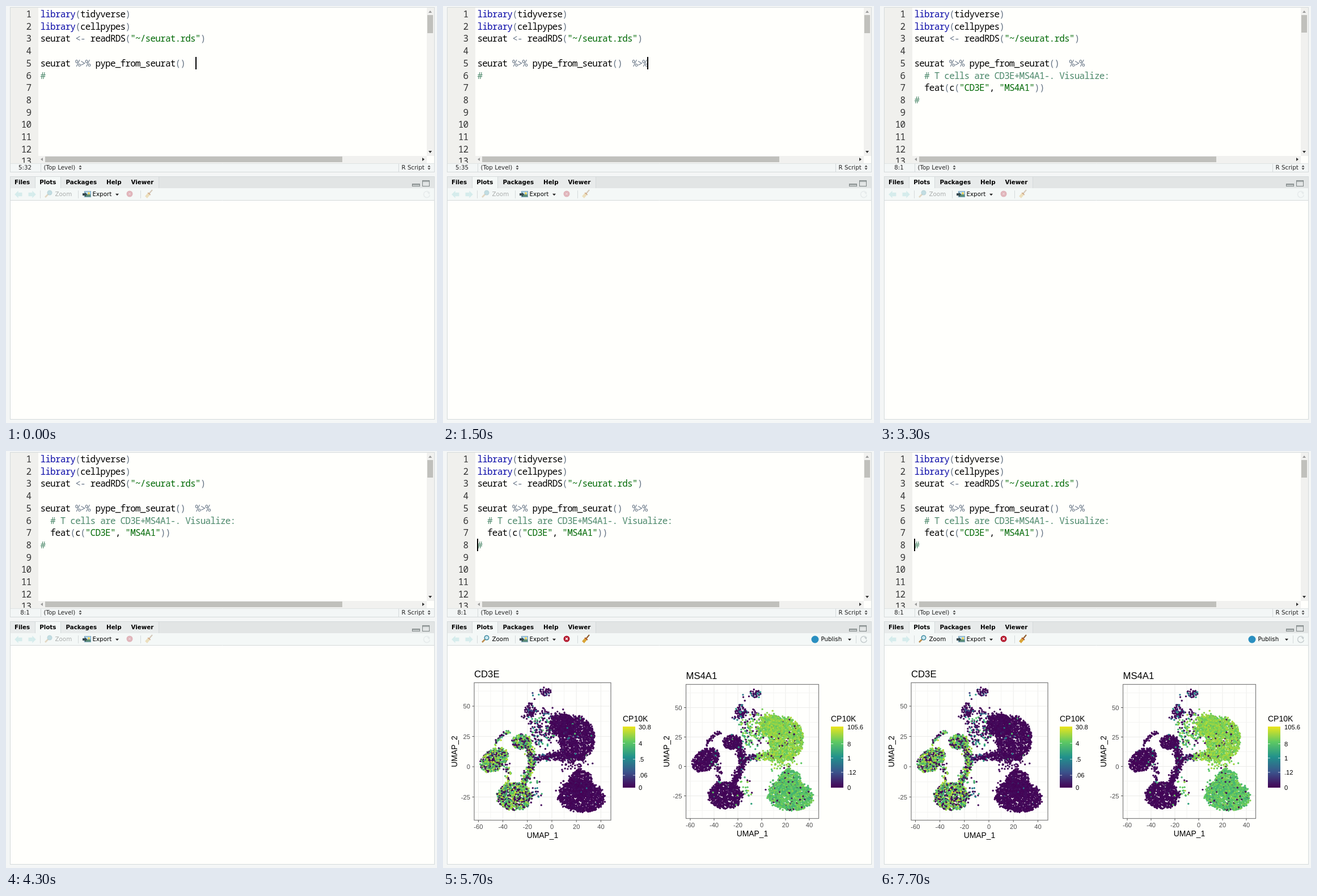
An HTML page with a canvas for the animation above (8 s loop, 760x737 px).

```html
<!DOCTYPE html>
<html lang="en">
<head>
<meta charset="utf-8">
<title>Feature plots in an R session</title>
<style>
  html, body { margin: 0; width: 100%; height: 100%; overflow: hidden; background: #f4f6f6; }
  canvas { display: block; }
</style>
</head>
<body>
<canvas id="stage" width="760" height="737"></canvas>
<script>
const W = 760, H = 737, LOOP = 8000;
const ctx = document.getElementById('stage').getContext('2d');
const UI = '10.3px "DejaVu Sans", sans-serif';
const CODE = '16px "Noto Sans Mono", monospace';
const ADVANCE = 8.82, LINE = 21.7, CODE_X = 60.4;
const PAPER = '#fffffc', BORDER = '#d5dadb', TRACK = '#f1f1ef', THUMB = '#c0c0bc';

// ---------- drawing helpers ----------
function rect(c, x, y, w, h, fill) {
  c.fillStyle = fill;
  c.fillRect(x, y, w, h);
}
function frame(c, x, y, w, h, color, width = 1) {
  c.strokeStyle = color;
  c.lineWidth = width;
  c.strokeRect(x, y, w, h);
}
function text(c, str, x, y, font, color = '#000', align = 'left') {
  c.font = font;
  c.fillStyle = color;
  c.textAlign = align;
  c.fillText(str, x, y);
}
function disc(c, x, y, r, fill) {
  c.fillStyle = fill;
  c.beginPath();
  c.arc(x, y, r, 0, Math.PI * 2);
  c.fill();
}
function line(c, x0, y0, x1, y1, color, width = 1) {
  c.strokeStyle = color;
  c.lineWidth = width;
  c.beginPath();
  c.moveTo(x0, y0);
  c.lineTo(x1, y1);
  c.stroke();
}
const vline = (c, x, y0, y1, color) => line(c, x, y0, x, y1, color);
const hline = (c, y, x0, x1, color) => line(c, x0, y, x1, y, color);

// Triangle of half-width w whose tip points along (dx, dy)
function triangle(c, x, y, w, h, dx, dy, color) {
  const tipX = x + dx * h / 2, tipY = y + dy * h / 2;
  const baseX = x - dx * h / 2, baseY = y - dy * h / 2;
  c.fillStyle = color;
  c.beginPath();
  c.moveTo(tipX, tipY);
  c.lineTo(baseX - dy * w, baseY + dx * w);
  c.lineTo(baseX + dy * w, baseY - dx * w);
  c.fill();
}
function arrow(c, x, y, dx, size, color) {
  triangle(c, x + dx * size * .55, y, size, size, dx, 0, color);
  rect(c, x - size * (dx > 0 ? 1 : .1), y - size / 2, size * 1.1, size, color);
}
function layer(draw) {
  const canvas = document.createElement('canvas');
  canvas.width = W;
  canvas.height = H;
  draw(canvas.getContext('2d'));
  return canvas;
}

// ---------- random cells ----------
let seed = 20;
function random() {
  seed = (seed + 0x6D2B79F5) | 0;
  let t = Math.imul(seed ^ (seed >>> 15), 1 | seed);
  t = (t + Math.imul(t ^ (t >>> 7), 61 | t)) ^ t;
  return ((t ^ (t >>> 14)) >>> 0) / 4294967296;
}
const between = (a, b) => a + (b - a) * random();
const gauss = () => random() + random() + random() + random() - 2;
const level = (zeros, lo, hi) => random() < zeros ? between(0, .04) : between(lo, hi);

// Cells per squared radius, and expression of both genes, for each kind of cell
const KINDS = {
  tcell:  { density: 1.05, cd3e: () => level(.33, .58, .94), ms4a1: () => level(.97, .4, .75) },
  bcell:  { density: 1.05, cd3e: () => level(.985, .3, .7), ms4a1: () => level(.05, .74, .9) },
  lowerB: { density: 1.1, cd3e: () => level(.995, .3, .6), ms4a1: () => level(.05, .62, .83) },
  mixed:  { density: .2, cd3e: () => level(.62, .35, .75), ms4a1: () => level(.2, .55, .88) },
  quiet:  { density: .45, cd3e: () => level(.8, .15, .6), ms4a1: () => level(.78, .15, .6) },
};
const cells = [];
function addCell(kind, x, y) {
  cells.push({ x, y, cd3e: KINDS[kind].cd3e(), ms4a1: KINDS[kind].ms4a1() });
}
// Evenly filled ellipse with a ragged rim
function cloud(kind, x, y, rx, ry, tilt = 0) {
  const cos = Math.cos(tilt), sin = Math.sin(tilt);
  for (let n = KINDS[kind].density * rx * ry; n > 0; n--) {
    const angle = between(0, Math.PI * 2);
    const r = Math.sqrt(random()) + gauss() * .06;
    const u = Math.cos(angle) * r * rx, v = Math.sin(angle) * r * ry;
    addCell(kind, x + u * cos - v * sin, y + u * sin + v * cos);
  }
}
// Loose scatter, densest in the middle
function haze(kind, count, x, y, rx, ry) {
  while (count-- > 0) addCell(kind, x + gauss() * rx, y + gauss() * ry);
}
// Band of cells along a quadratic curve
function trail(kind, count, [ax, ay], [bx, by], [cx, cy], width) {
  while (count-- > 0) {
    const t = random(), s = 1 - t;
    addCell(kind,
      s * s * ax + 2 * s * t * bx + t * t * cx + gauss() * width,
      s * s * ay + 2 * s * t * by + t * t * cy + gauss() * width);
  }
}

cloud('quiet', 182, 426, 10, 6);
haze('quiet', 14, 176, 429, 18, 8);
cloud('quiet', 153, 458, 9, 13);
trail('quiet', 45, [142, 472], [164, 456], [188, 462], 5);
cloud('mixed', 178, 487, 28, 24);
haze('mixed', 30, 172, 514, 18, 12);

cloud('bcell', 235, 507, 32, 39, -.1);
cloud('bcell', 210, 484, 21, 20, .5);
haze('bcell', 110, 206, 480, 22, 20);
trail('quiet', 75, [160, 547], [172, 539], [188, 541], 5);
trail('bcell', 170, [184, 541], [205, 533], [230, 545], 6);
haze('bcell', 50, 234, 551, 24, 10);

cloud('lowerB', 244, 611, 41, 27, .06);
cloud('lowerB', 243, 588, 21, 25);
haze('lowerB', 60, 222, 588, 20, 18);

cloud('tcell', 126, 611, 31, 24, .1);
trail('tcell', 330, [136, 594], [167, 558], [148, 520], 6);
cloud('tcell', 139, 514, 17, 13);
cloud('tcell', 90, 546, 27, 18, -.62);
trail('tcell', 45, [93, 518], [101, 500], [118, 496], 3);
trail('tcell', 40, [108, 552], [120, 568], [114, 588], 6);
haze('mixed', 26, 164, 600, 14, 22);

// ---------- plots ----------
const VIRIDIS = ['440154', '3b528b', '21918c', '5ec962', 'ece51b']
  .map(hex => [0, 2, 4].map(i => parseInt(hex.slice(i, i + 2), 16)));
const rgb = parts => `rgb(${parts.map(Math.round)})`;
function viridis(t) {
  const p = t * (VIRIDIS.length - 1), k = Math.min(Math.floor(p), VIRIDIS.length - 2);
  return rgb(VIRIDIS[k].map((v, i) => v + (VIRIDIS[k + 1][i] - v) * (p - k)));
}
const sans = size => `${size}px "Liberation Sans", Arial, sans-serif`;

function legend(c, x, labelX, firstY, step, [max, ...labels]) {
  const top = 487, bottom = 595;
  text(c, 'CP10K', x, 478, sans(14));
  const ramp = c.createLinearGradient(0, bottom, 0, top);
  VIRIDIS.forEach((v, i) => ramp.addColorStop(i / (VIRIDIS.length - 1), rgb(v)));
  rect(c, x, top, 22, bottom - top, ramp);
  text(c, max, labelX, top + 5, sans(11.2));
  labels.forEach((label, i) => {
    const y = firstY + step * i;
    hline(c, y, x, x + 4, '#ffffffb0');
    hline(c, y, x + 18, x + 22, '#ffffffb0');
    text(c, label, labelX, y + 4, sans(11.2));
  });
  text(c, '0', labelX, bottom + 4, sans(11.2));
}

function plot(c, { gene, title, box: [x0, y0, x1, y1], zero: [zx, zy], unit: [ux, uy] }) {
  const px = v => zx + v * ux, py = v => zy - v * uy;
  rect(c, x0, y0, x1 - x0, y1 - y0, '#fffffd');
  for (let v = -60; v <= 40; v += 10) vline(c, px(v), y0, y1, v % 20 ? '#f4f4f2' : '#ebebe9');
  for (let v = -37.5; v <= 62.5; v += 12.5) hline(c, py(v), x0, x1, v % 25 ? '#f4f4f2' : '#ebebe9');
  for (const cell of cells) {
    disc(c, px((cell.x - 192) / 2.16), py((558 - cell.y) / 2.14), 1.7, viridis(cell[gene]));
  }
  frame(c, x0, y0, x1 - x0, y1 - y0, '#7c7c7c', 1.2);
  for (let v = -60; v <= 40; v += 20) {
    vline(c, px(v), y1, y1 + 3.5, '#555');
    text(c, v, px(v), y1 + 15.5, sans(11.2), '#4d4d4d', 'center');
  }
  for (let v = -25; v <= 50; v += 25) {
    hline(c, py(v), x0 - 3.5, x0, '#555');
    text(c, v, x0 - 7, py(v) + 4, sans(11.2), '#4d4d4d', 'right');
  }
  text(c, title, x0, y0 - 10, sans(16.7));
  text(c, 'UMAP_1', (x0 + x1) / 2, y1 + 31.5, sans(13.9), '#000', 'center');
  c.save();
  c.translate(x0 - 30, (y0 + y1) / 2);
  c.rotate(-Math.PI / 2);
  text(c, 'UMAP_2', 0, 0, sans(13.9), '#000', 'center');
  c.restore();
}

const plots = layer(c => {
  plot(c, { gene: 'cd3e', title: 'CD3E', box: [55, 409.5, 296, 652.5], zero: [192, 558], unit: [2.16, 2.14] });
  legend(c, 317, 345, 516.5, 28.3, ['30.8', '4', '.5', '.06']);
  plot(c, { gene: 'ms4a1', title: 'MS4A1', box: [428.5, 412.5, 662.5, 649.5], zero: [562, 557.5], unit: [2.1, 2.08] });
  legend(c, 684, 713, 517.5, 25.2, ['105.6', '8', '1', '.12']);
});

// ---------- window ----------
function upDown(c, x, y) {
  triangle(c, x, y - 2.5, 2.5, 3, 0, -1, '#444');
  triangle(c, x, y + 2.5, 2.5, 3, 0, 1, '#444');
}
function windowButton(c, x, y, w, h) {
  frame(c, x, y, w, h, '#7c8484');
  rect(c, x + .5, y + .5, w - 1, 2, '#a7adad');
}

const shell = layer(c => {
  rect(c, 0, 0, W, H, '#f4f6f6');

  // editor pane
  rect(c, 8, 3, 747, 290, PAPER);
  rect(c, 8, 3, 49, 275, '#f0f0ed');
  rect(c, 742, 3, 13, 262, TRACK);
  rect(c, 57, 265, 685, 13, TRACK);
  rect(c, 69, 266, 524, 10, THUMB);
  triangle(c, 748, 10, 3, 4, 0, -1, '#999');
  triangle(c, 748, 258, 3, 4, 0, 1, '#333');
  triangle(c, 63, 271, 3, 4, -1, 0, '#999');
  triangle(c, 736, 271, 3, 4, 1, 0, '#333');
  rect(c, 8, 278, 747, 15, '#f3f6f6');
  hline(c, 278.5, 8, 755, '#dfe3e3');
  vline(c, 61.5, 279, 293, BORDER);
  vline(c, 692.5, 279, 293, BORDER);
  text(c, '(Top Level)', 66.5, 288.5, UI, '#222');
  text(c, 'R Script', 697.5, 288.5, UI, '#222');
  upDown(c, 131, 285.5);
  upDown(c, 746, 285.5);
  frame(c, 7.5, 2.5, 748, 291, BORDER);

  // plots pane
  rect(c, 8, 302, 747, 428, PAPER);
  rect(c, 8, 302, 747, 20, '#e2e5e5');
  rect(c, 8, 302, 262, 20, '#e8ebeb');
  rect(c, 52, 302, 44, 20, '#f4f8f7');
  [51.5, 96.5, 269.5].forEach(x => vline(c, x, 302, 322, BORDER));
  rect(c, 8, 322, 747, 21, '#f4f8f7');
  hline(c, 343.5, 8, 755, BORDER);
  let tabX = 15;
  for (const label of ['Files', 'Plots', 'Packages', 'Help', 'Viewer']) {
    text(c, label, tabX, 314.5, 'bold ' + UI);
    tabX += c.measureText(label).width + 17;
  }
  windowButton(c, 716.5, 314.5, 13, 4);
  windowButton(c, 734.5, 308.5, 12, 10);
  frame(c, 7.5, 301.5, 748, 429, BORDER);

  // toolbar parts that never change
  arrow(c, 22, 333, -1, 6.5, '#d5ecec');
  arrow(c, 46, 333, 1, 6.5, '#d5ecec');
  [60.5, 127.5, 237.5].forEach(x => vline(c, x, 326, 340, BORDER));
  rect(c, 138, 327, 12, 11, '#7aa3bd');
  rect(c, 139, 328, 10, 5, '#b5daf0');
  rect(c, 139, 333, 10, 4, '#5f8f78');
  disc(c, 146, 331, 2, '#f0d257');
  arrow(c, 139, 333, 1, 4, '#35494f');
  text(c, 'Export', 152.5, 336, UI);
  triangle(c, 196, 333.5, 3, 3.5, 0, 1, '#222');
});

function toolbar(ready) {
  ctx.save();
  ctx.globalAlpha = ready ? 1 : .3;
  line(ctx, 69, 338, 74, 333, '#b98a4a', 2.5);
  disc(ctx, 77, 330, 4.5, '#3f8aa0');
  disc(ctx, 77, 330, 3, '#cdeaf2');
  text(ctx, 'Zoom', 86.5, 336, UI);
  disc(ctx, 218, 332, 5.5, '#b3182d');
  line(ctx, 216, 330, 220, 334, '#fff', 1.5);
  line(ctx, 220, 330, 216, 334, '#fff', 1.5);
  line(ctx, 258, 325, 252, 332, '#8c5a2c', 2);
  line(ctx, 253, 331, 247, 338, '#d9a437', 5);
  line(ctx, 250, 330, 255, 334, '#a13c2c', 1.5);
  ctx.strokeStyle = '#c6cdcf';
  ctx.lineWidth = 1.5;
  ctx.beginPath();
  ctx.arc(742, 333, 5.5, .2, 5.4);
  ctx.stroke();
  triangle(ctx, 746, 330, 3, 4, .7, -.7, '#c6cdcf');
  ctx.restore();
  if (!ready) return;
  disc(ctx, 656, 333, 6.5, '#2a8fc0');
  text(ctx, 'Publish', 666.5, 336, UI);
  triangle(ctx, 717, 333.5, 3, 3.5, 0, 1, '#222');
  vline(ctx, 728.5, 326, 340, BORDER);
}

// ---------- editor ----------
const TOKEN = /#.*|"[^"]*"|[\w.]+|,|[^\s\w",#]+/g;
function tokenColor(token) {
  if (token[0] === '#') return '#4c886b';
  if (token[0] === '"') return '#036a07';
  if (token === 'library') return '#0a0aa8';
  return /^[\w,]/.test(token) ? '#000' : '#687687';
}
function codeText(str, x, row, color) {
  ctx.letterSpacing = '-0.78px';
  text(ctx, str, x, 20 + LINE * row, CODE, color);
  ctx.letterSpacing = '0px';
}
function codeLine(str, row) {
  for (const { 0: token, index } of str.matchAll(TOKEN)) {
    codeText(token, CODE_X + ADVANCE * index, row, tokenColor(token));
  }
}

const HEAD = ['library(tidyverse)', 'library(cellpypes)', 'seurat <- readRDS("~/seurat.rds")', ''];
const PIPE = 'seurat %>% pype_from_seurat()  ';
const STEPS = ['  # T cells are CD3E+MS4A1-. Visualize:', '  feat(c("CD3E", "MS4A1"))'];

// The caret rests for part of each second, and stays on while typing
function caretVisible(t) {
  if (t >= 1200 && t < 2600) return true;
  if (t >= 2600 && t < 3000) return false;
  const off = t >= 5000 && t < 7000 ? 500 : 300;
  return t % 1000 < off || t % 1000 >= 700;
}

function editorState(t) {
  const typed = [1200, 1400, 1500].filter(at => t >= at).length;
  const body = t < 2000 ? [] : t < 2200 ? [''] : STEPS;
  const lines = [...HEAD, PIPE + '%>%'.slice(0, typed), ...body, '#'];
  const caret = t < 2000 ? [5, 32 + typed] : t < 2200 ? [6, 3] : t < 2600 ? [7, 27] : [8, 1];
  return { lines, caret };
}

function drawEditor(t) {
  const { lines, caret: [row, col] } = editorState(t);
  rect(ctx, 743, 16, 10, t < 2200 ? 32 : 31, THUMB);
  ctx.save();
  ctx.beginPath();
  ctx.rect(8, 3, 49, 274);
  ctx.clip();
  for (let n = 1; n <= 13; n++) {
    const label = String(n);
    codeText(label, 44.3 - ADVANCE * label.length, n - 1, '#333');
  }
  ctx.restore();
  if (row === 7) rect(ctx, CODE_X + ADVANCE * 6, 133.5, ADVANCE, 21.5, '#d3d3d0');
  lines.forEach(codeLine);
  if (caretVisible(t)) {
    rect(ctx, Math.round(CODE_X + ADVANCE * (col - 1)), Math.round(3.2 + LINE * (row - 1)), 2, 22, '#000');
  }
  text(ctx, `${row}:${col}`, 33.5, 288.5, UI, '#222', 'center');
}

function render(now) {
  const t = now % LOOP, ready = t >= 4400;
  ctx.drawImage(shell, 0, 0);
  drawEditor(t);
  toolbar(ready);
  if (ready) ctx.drawImage(plots, 0, 0);
}

let start;
function tick(now) {
  start ??= now;
  render(now - start);
  requestAnimationFrame(tick);
}
render(0);
requestAnimationFrame(tick);
</script>
</body>
</html>
```
